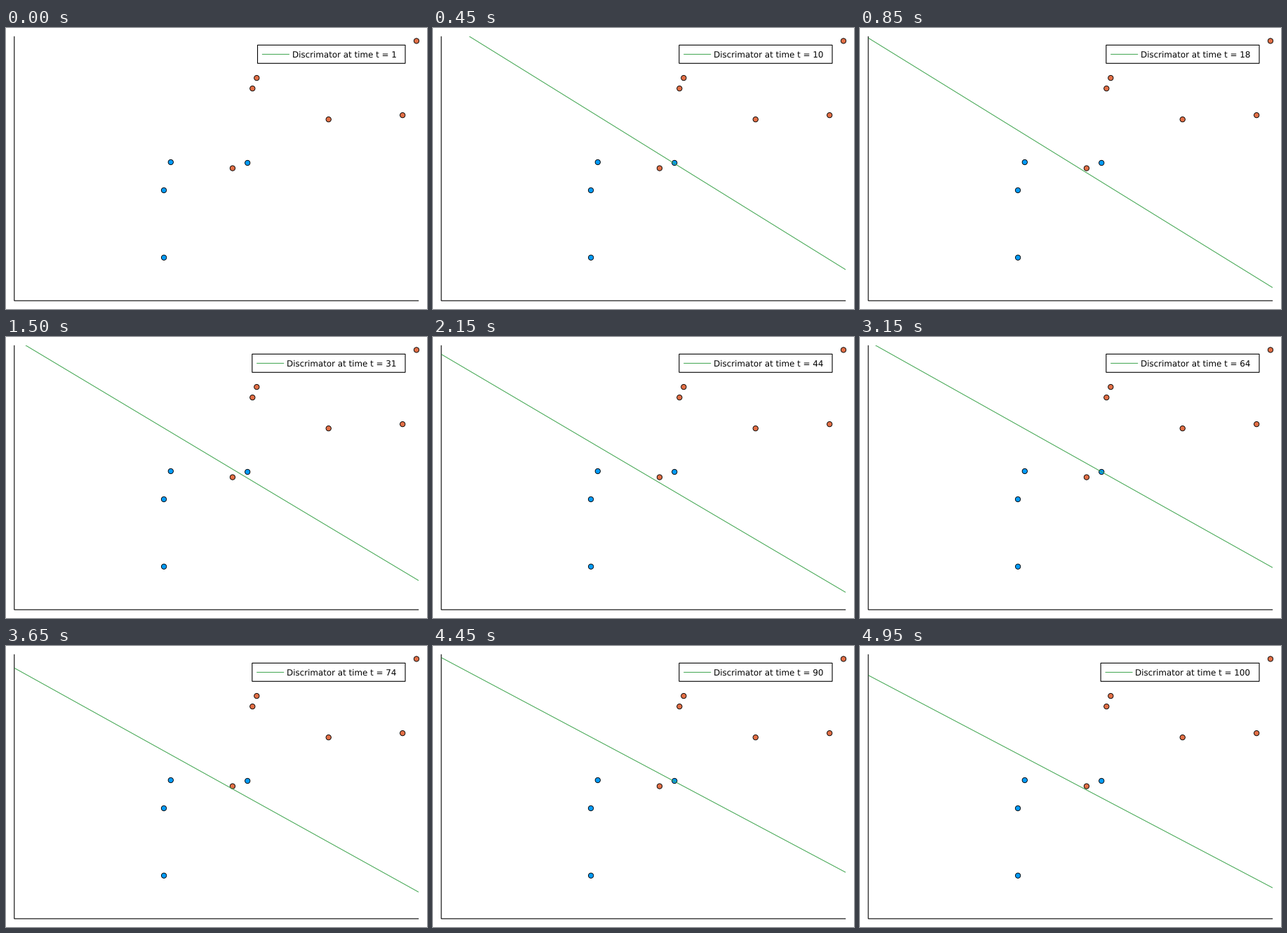
Recreate the animation shown at these times as a matplotlib script. Size 600 px wide and 400 px high, loop 5 s.

```python
import numpy as np
import matplotlib.pyplot as plt
from matplotlib.animation import FuncAnimation
from matplotlib.patches import Circle, Rectangle

W, H = 600, 400
FRAMES, INTERVAL = 100, 50
PX = 0.72  # points per pixel at 100 dpi
LEFT, RIGHT, TOP, BOTTOM = 11.8, 588.2, 11.8, 388.2
BLUE, ORANGE, GREEN = "#009afa", "#e26f46", "#3da44d"

BLUES = [(234.8, 191), (225, 231), (344.2, 192), (225.1, 326.8)]
ORANGES = [(585, 18.4), (357.3, 71.1), (351.3, 86.1), (459.7, 130.1),
           (565.2, 124.1), (322.9, 199.6)]

# The boundary drifts up and springs back down once per cycle.
PIVOT, CYCLE, RESET = 375, 26, 13

plt.rcParams["text.hinting"] = "none"
fig = plt.figure(figsize=(W / 100, H / 100), dpi=100, facecolor="white")
ax = fig.add_axes([0, 0, 1, 1])
ax.set_xlim(0, W)
ax.set_ylim(H, 0)
ax.axis("off")


def stroke(xs, ys, color, width=1.0, z=3):
    line, = ax.plot(xs, ys, color=color, lw=width * PX, zorder=z, snap=False,
                    solid_capstyle="butt", solid_joinstyle="miter")
    return line


def dots(points, color):
    for p in points:
        ax.add_patch(Circle(p, 3.65, fc=color, ec="black", lw=0.9 * PX,
                            zorder=2))


stroke([LEFT, LEFT, RIGHT], [TOP, BOTTOM, BOTTOM], "black", 1.1, z=1)
dots(BLUES, BLUE)
dots(ORANGES, ORANGE)

boundary = stroke([], [], GREEN)
area = Rectangle((LEFT, TOP), RIGHT - LEFT, BOTTOM - TOP,
                 transform=ax.transData)
boundary.set_clip_path(area)

frame = Rectangle((0, 24.3), 210, 26, fc="white", ec="black", lw=1.1 * PX,
                  zorder=4, snap=False)
ax.add_patch(frame)
sample = stroke([], [], GREEN, z=5)
label = ax.text(0, 42, "", family="DejaVu Sans", size=11.9 * PX,
                color="black", ha="left", va="baseline", zorder=5)


def boundary_y(t, x):
    phase = (t - RESET) % CYCLE
    height = 245.4 - 1.45 * phase
    tilt = 0.6382 - 0.0011 * t - 0.00035 * phase
    return height + tilt * (x - PIVOT)


def draw(i):
    t = i + 1
    xs = np.array([LEFT, RIGHT]) if t > 1 else np.array([])
    boundary.set_data(xs, boundary_y(t, xs))

    # The legend grows to the left with each extra digit.
    left = 358.5 - 7.7 * (len(str(t)) - 1)
    frame.set_x(left)
    frame.set_width(569 - left)
    sample.set_data([left + 6.4, left + 45.4], [37.4, 37.4])
    label.set_x(left + 49.4)
    label.set_text(f"Discrimator at time t = {t}")
    return boundary, frame, sample, label


anim = FuncAnimation(fig, draw, frames=FRAMES, interval=INTERVAL,
                     repeat=True, repeat_delay=0, blit=False)
plt.show()
```
